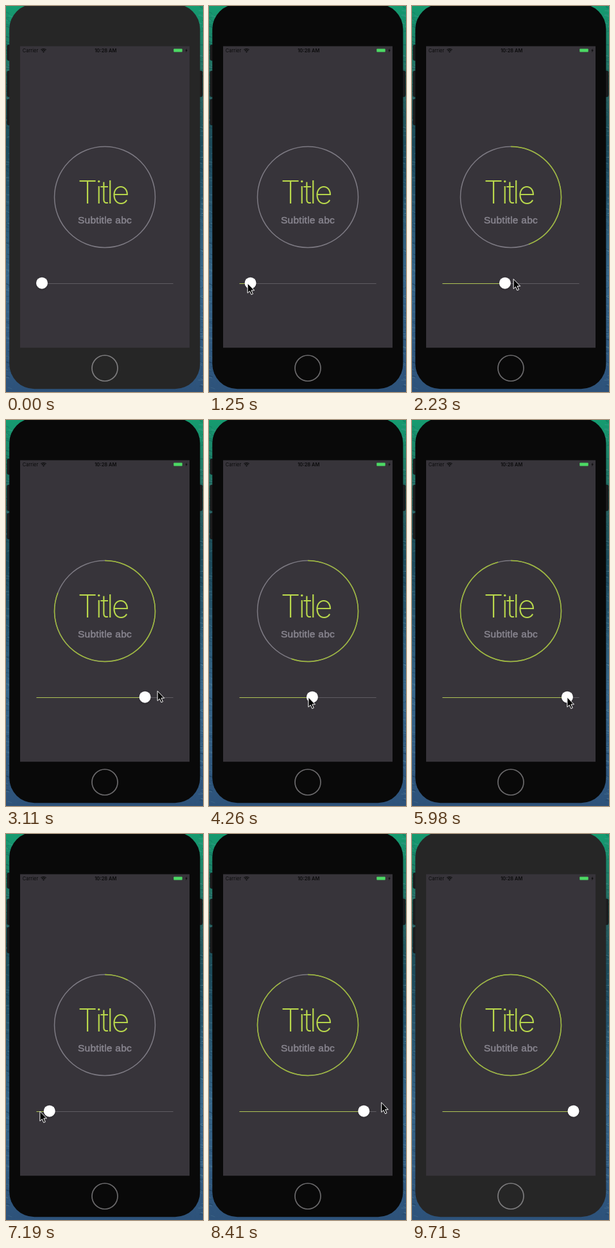
An HTML page that plays this animation: 307 px wide and 600 px high, repeating every 9790 ms.

```html
<!DOCTYPE html>
<html lang="en">
<head>
<meta charset="utf-8">
<title>Circular progress</title>
<style>
  html, body { margin: 0; width: 100%; height: 100%; overflow: hidden; background: #244a63; }
  svg { display: block; width: 100vw; height: 100vh; }
  .status { font: 7.5px Inter, sans-serif; fill: #0b0b0c; }
  .title { font: 200 49px Inter, sans-serif; letter-spacing: -3.3px; fill: #b9d84c; }
  .subtitle { font: 15.5px "Liberation Sans", Arial, sans-serif; letter-spacing: .25px; fill: #88858f; }
</style>
</head>
<body>
<svg viewBox="0 0 307 600">
  <defs>
    <linearGradient id="sea" x2="0" y2="1">
      <stop offset="0" stop-color="#159b70"/>
      <stop offset=".22" stop-color="#28625f"/>
      <stop offset=".36" stop-color="#1c4a5a"/>
      <stop offset=".7" stop-color="#37678b"/>
      <stop offset="1" stop-color="#2d527a"/>
    </linearGradient>
    <filter id="soft" x="-50%" y="-50%" width="200%" height="200%">
      <feGaussianBlur stdDeviation="1.5"/>
    </filter>
  </defs>
  <rect width="307" height="600" fill="url(#sea)"/>
  <g id="waves" fill="none"></g>

  <g fill="#1d1d1e" stroke="#0c0c0d" stroke-width=".6">
    <rect x="1.8" y="60.5" width="8" height="24" rx="2"/>
    <rect x="1.8" y="101" width="8" height="40" rx="2"/>
    <rect x="1.8" y="145" width="8" height="40" rx="2"/>
    <rect x="298" y="101" width="8" height="40" rx="2"/>
  </g>
  <rect id="body" x="5.2" y="-3" width="297.2" height="598.3" rx="39"/>
  <circle id="home" cx="154" cy="563" r="20" fill="none" stroke-width="1.7"/>
  <rect x="22" y="62.5" width="264" height="468.7" fill="#37343a"/>

  <g class="status">
    <text x="25.7" y="72">Carrier</text>
    <text x="155.3" y="72" font-weight="600" text-anchor="middle">10:28 AM</text>
    <path d="M58.5 72.6L57 70.9a2.2 2.2 0 0 1 3 0z"/>
    <path d="M55.9 69.7a3.8 3.8 0 0 1 5.2 0M54.4 68.1a6 6 0 0 1 8.2 0" fill="none" stroke="#0b0b0c" stroke-width="1.2"/>
    <path d="M281.6 66l-2.2 3.4h1.5l-.7 3 2.6-3.8h-1.6z"/>
  </g>
  <rect x="261.3" y="66.4" width="13.4" height="5.2" rx=".8" fill="#4cd964"/>

  <g fill="none" stroke-width="1.5">
    <circle cx="154" cy="297" r="78.5" stroke="#7d7a83"/>
    <path id="ring" stroke="#9fbb39"/>
  </g>
  <text class="title" x="111.8" y="306.5">Title</text>
  <text class="subtitle" x="154" y="337.8" text-anchor="middle" stroke="#88858f" stroke-width=".5">Subtitle abc</text>

  <path d="M47.5 431.5H260.5" stroke="#5f5c62"/>
  <path id="fill" stroke="#afc455"/>
  <g id="thumb">
    <circle cy="1.6" r="8.8" opacity=".25" filter="url(#soft)"/>
    <circle r="9" fill="#fff"/>
  </g>
  <path id="cursor" d="M0 0V15.2L3.4 12.1L5.8 17.6L8.4 16.5L6 11H10.6Z" fill="#050505" stroke="#fff" stroke-linejoin="round"/>
</svg>
<script>
const LOOP = 9790, GRAB = 1250, X0 = 56, X1 = 251.5;
const $ = id => document.getElementById(id);
const set = (id, name, value) => $(id).setAttribute(name, value);
const clamp = (v, lo, hi) => Math.min(hi, Math.max(lo, v));

// Turning points of the drag: time, thumb x, pointer x
const drag = [
  [GRAB, 64.5, 60],
  [3110, 216.5, 236],
  [3430, 242, 255],
  [4260, 161, 155],
  [4600, 124, 118],
  [5450, X1, 273],
  [5700, X1, 268],
  [5980, 242, 242],
  [7430, X0, 42],
  [7620, X0, 44],
  [8410, 241, 268.5],
  [8650, 300, 309]
];

// Monotone cubic interpolation of one column
function sample(col, t) {
  const last = drag.length - 1;
  if (t >= drag[last][0]) return drag[last][col];
  const i = drag.findIndex(k => k[0] > t) - 1;
  const slope = j => (drag[j + 1][col] - drag[j][col]) / (drag[j + 1][0] - drag[j][0]);
  const tangent = j => {
    if (j === 0) return slope(0);
    if (j === last) return slope(last - 1);
    const a = slope(j - 1), b = slope(j);
    return a * b <= 0 ? 0 : 2 * a * b / (a + b);
  };
  const [t0, t1] = [drag[i][0], drag[i + 1][0]];
  const h = t1 - t0, u = (t - t0) / h, w = 1 - u;
  return drag[i][col] * (1 + 2 * u) * w * w + drag[i + 1][col] * u * u * (3 - 2 * u)
    + h * u * w * (tangent(i) * w - tangent(i + 1) * u);
}

const thumbX = t => t < GRAB ? X0 : clamp(sample(1, t), X0, X1);

function pointer(t) {
  if (t < GRAB) {
    const u = clamp((t - 390) / 630, 0, 1), ease = u * (2 - u);
    return [278 - 219 * ease, 449 - 16 * ease];
  }
  if (t >= 9060) return [303, 419 + 182 * (t - 9060) / 330];
  // The pointer rises as it runs ahead of the thumb
  const x = sample(2, t), lead = Math.max(0, x - thumbX(t));
  return [x, 431 - lead / 2];
}

function arc(p) {
  if (p <= 0) return '';
  const a = Math.min(p, .9999) * 2 * Math.PI;
  const x = 154 + 78.5 * Math.sin(a), y = 297 - 78.5 * Math.cos(a);
  return `M154 218.5A78.5 78.5 0 ${p > .5 ? 1 : 0} 1 ${x} ${y}`;
}

function drawWaves() {
  let seed = 7, out = '';
  const rnd = () => (seed = seed * 16807 % 2147483647) / 2147483647;
  for (let i = 0; i < 300; i++) {
    const x = (i % 2 ? 298 : -4) + rnd() * 8, y = rnd() * 600;
    const tone = rnd() < .5 ? '#0c2c44' : '#6f9fae';
    out += `<path d="M${x} ${y}q3 ${rnd() * 4 - 2} 7 ${rnd() * 3}" stroke="${tone}" opacity="${.15 + rnd() * .25}"/>`;
  }
  $('waves').innerHTML = out;
}

function render(t) {
  const active = t >= GRAB && t < 9710;
  set('body', 'fill', active ? '#090909' : '#262626');
  set('home', 'stroke', active ? '#6b6a6c' : '#7d7c7e');

  const x = thumbX(t);
  set('thumb', 'transform', `translate(${x} 430.7)`);
  set('fill', 'd', t < GRAB ? '' : `M47.5 431.5H${x}`);
  set('ring', 'd', arc((thumbX(t - 30) - X0) / (X1 - X0)));

  set('cursor', 'visibility', t >= 390 && t < 9390 ? 'visible' : 'hidden');
  set('cursor', 'transform', `translate(${pointer(t)})`);
}

drawWaves();
const start = performance.now();
function tick() {
  render((performance.now() - start) % LOOP);
  requestAnimationFrame(tick);
}
tick();
</script>
</body>
</html>
```
